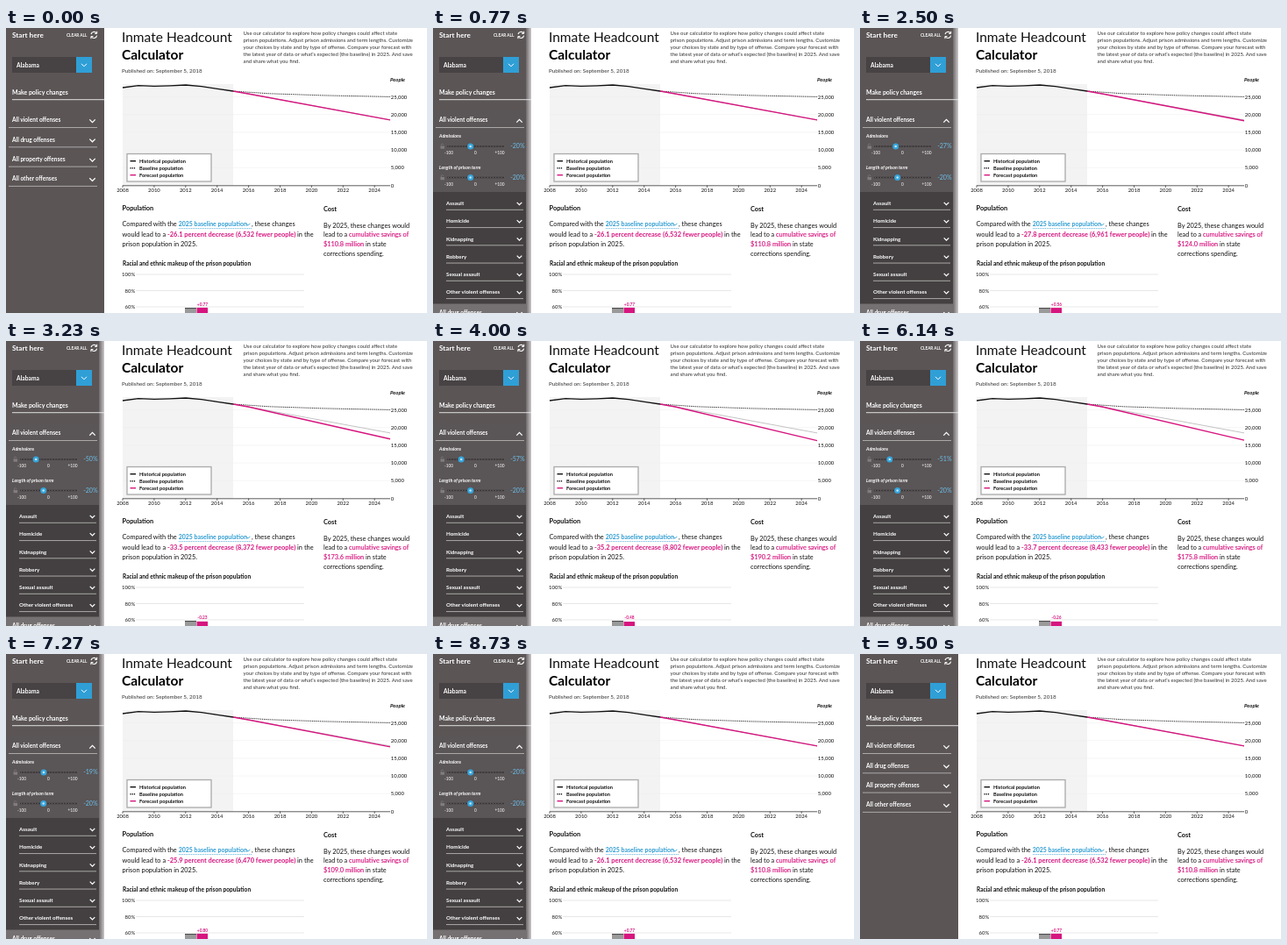
Write an HTML page that moves like this. It is 480x325 px and loops after 9.63 s.

```html
<!DOCTYPE html>
<html lang="en">
<head>
<meta charset="utf-8">
<title>Inmate Headcount Calculator</title>
<style>
html, body { margin: 0; width: 100%; height: 100%; overflow: hidden; background: #fff; }
svg { display: block; width: 480px; height: 325px; font-family: Lato, "Open Sans", sans-serif; }
.b { font-weight: 700; }
.i { font-style: italic; }
.pink { fill: #d6157f; }
.big { font-size: 7.48px; }
.soft { stroke: #d6157f; stroke-width: .15px; }
text { white-space: pre; }
</style>
</head>
<body>
<svg id="stage" viewBox="0 0 480 325" xmlns="http://www.w3.org/2000/svg">
  <defs>
    <linearGradient id="edge">
      <stop offset="0" stop-color="#6d6869"/>
      <stop offset="1" stop-color="#cbc8ca"/>
    </linearGradient>
  </defs>
</svg>
<script>
const LOOP = 9630;
const PINK = '#d6157f', BLUE = '#2b9bd2', SIDE = '#5b5556', RULE = '#b5b1b1';
const stage = document.getElementById('stage');

function add(parent, tag, attrs, content) {
  const node = document.createElementNS('http://www.w3.org/2000/svg', tag);
  for (const key in attrs) node.setAttribute(key, attrs[key]);
  if (content !== undefined) node.textContent = content;
  parent.appendChild(node);
  return node;
}
const group = parent => add(parent, 'g', {});
const rect = (g, x, y, width, height, fill, more) =>
  add(g, 'rect', { x, y, width, height, fill, ...more });
const path = (g, d, stroke, width, more) =>
  add(g, 'path', { d, stroke, 'stroke-width': width, fill: 'none', ...more });
const label = (g, x, y, size, content, fill = '#111', cls = '', more) =>
  add(g, 'text', { x, y, 'font-size': size, fill, class: cls, ...more }, content);
const chevron = (g, x, y, w = 3.2, dir = 1, color = '#fff', width = 1.3) =>
  path(g, `M${x - w} ${y - dir * w / 2}l${w} ${dir * w}l${w} ${-dir * w}`, color, width);
const span = (t, content, cls = '') => add(t, 'tspan', { class: cls }, content);
const END = { 'text-anchor': 'end' }, MID = { 'text-anchor': 'middle' };

// Heading and introduction
const main = group(stage);
label(main, 132, 16, 15.5, 'Inmate Headcount');
label(main, 132, 35.7, 15.5, 'Calculator', '#000', 'b');
label(main, 132, 51.4, 6.3, 'Published on: September 5, 2018', '#333');
[
  'Use our calculator to explore how policy changes could affect state',
  'prison populations. Adjust prison admissions and term lengths. Customize',
  'your choices by state and by type of offense. Compare your forecast with',
  'the latest year of data or what’s expected (the baseline) in 2025. And save',
  'and share what you find.'
].forEach((s, i) => label(main, 270.5, 7.6 + i * 8.05, 6.02, s, '#333'));

// Line chart
const BASE = 25006;
const yOf = n => 179.5 - n / 5000 * 20.2;
const forecastPath = n => `M259 72L276 75L438 ${yOf(n).toFixed(2)}`;

rect(main, 133, 64, 126, 115.5, '#f3f3f3');
label(main, 438, 61.2, 6, 'People', '#111', 'b i');
for (let n = 0; n <= 25000; n += 5000) {
  const y = yOf(n);
  if (n) path(main, `M133 ${y}H438`, '#ececec', 0.5);
  label(main, 438.8, y + 2, 5.9, n.toLocaleString('en-US'));
}
path(main, 'M133 179.8H438', '#333', 0.8);
for (let k = 0; k < 9; k++) {
  const x = 133 + k * 35.9;
  path(main, `M${x} 179.5v2.5`, '#333', 0.7);
  label(main, x, 187, 5.9, 2008 + 2 * k, '#111', '', MID);
}
path(main, forecastPath(BASE - 6532), '#bdbdbd', 0.9);
path(main, 'M259 72L300 74.8L360 76.8L438 78.4', '#222', 1, { 'stroke-dasharray': '1.2 1' });
const forecast = path(main, '', PINK, 1.4);
path(main, 'M133 68L151 65.6L169 66.4L187 65.8L205 65L223 66.6L241 69.3L259 72', '#111', 1.3);

rect(main, 138, 143.5, 96, 31.5, '#fff', { stroke: '#aaa', 'stroke-width': 1.3 });
[['Historical', '#111', ''], ['Baseline', '#111', '1.2 1'], ['Forecast', PINK, '']]
  .forEach(([name, color, dash], i) => {
    const y = 151.7 + i * 8;
    path(main, `M141.5 ${y}h6.5`, color, 1.4, dash ? { 'stroke-dasharray': dash } : {});
    label(main, 152, y + 1.9, 5.7, name + ' population', '#111', 'b');
  });

// Summary text
label(main, 132.5, 207.6, 7.4, 'Population', '#111', 'b');
label(main, 132.5, 225.6, 7.4, 'Compared with the');
label(main, 196.7, 225.6, 6.95, '2025 baseline population', BLUE, 'b');
path(main, 'M197 228.6H280', BLUE, 0.7, { 'stroke-dasharray': '1.2 .8' });
chevron(main, 276, 224, 2.4, 1, BLUE, 0.9);
label(main, 280, 225.6, 7.4, ', these changes');
const popLine = label(main, 132.5, 238, 7.4, '');
span(popLine, 'would lead to a ');
const popText = span(popLine, '', 'b pink big');
span(popLine, ' in the');
label(main, 132.5, 249.2, 7.4, 'prison population in 2025.');

label(main, 362, 208.6, 7.4, 'Cost', '#111', 'b');
label(main, 362, 227.7, 7.35, 'By 2025, these changes would');
const costLine = label(main, 362, 238.4, 7.25, '');
span(costLine, 'lead to a ');
span(costLine, 'cumulative savings of', 'pink soft');
const savedLine = label(main, 362, 249.4, 7.35, '');
const saved = span(savedLine, '', 'pink soft');
span(savedLine, ' in state');
label(main, 362, 260.2, 7.35, 'corrections spending.');

// Bar chart
label(main, 133, 271.2, 6.58, 'Racial and ethnic makeup of the prison population', '#111', 'b');
[100, 80, 60].forEach((n, i) => {
  const y = 281 + i * 18.5;
  path(main, `M148 ${y}H340`, '#dedede', 0.7);
  label(main, 147.2, y + 2.1, 5.95, n + '%', '#111', '', END);
});
rect(main, 204, 319.6, 13, 6, '#9a9a9a');
path(main, 'M204 319.6h13', '#333', 0.9);
const bar = rect(main, 217.5, 318.9, 12.5, 8, PINK);
const barText = label(main, 224, 316.6, 4.8, '', PINK, 'b', MID);

// Sidebar
const side = group(stage);
const sideText = (x, y, size, s, g = side) => label(g, x, y, size, s, '#fff', 'b');
rect(side, 0, 0, 112, 325, SIDE);
sideText(7, 11, 8.2, 'Start here');
sideText(69, 9.7, 4.65, 'CLEAR ALL');
path(side, 'M97 7.2a3.4 3.4 0 0 1 6.2 -1.2M103.6 8.6a3.4 3.4 0 0 1 -6.2 1.4', '#fff', 1.1);
path(side, 'M103.7 3.8v2.6h-2.6M96.9 12.2v-2.6h2.6', '#fff', 1);
rect(side, 7, 33, 73, 18, '#474243');
rect(side, 80, 33, 18, 18, '#2f9fd6');
chevron(side, 89, 42.3, 3, 1, '#fff', 1);
sideText(12, 44.5, 6.7, 'Alabama');
sideText(7, 75.8, 6.95, 'Make policy changes');

const panel = group(side);
rect(panel, 0, 94, 106, 93, '#5a5556');
rect(panel, 0, 187, 106, 140, '#444041');

function slider(name, y) {
  label(panel, 7, y - 9.7, 5.3, name, '#fff', 'b i');
  rect(panel, 8.5, y - 0.5, 4.5, 3.2, '#817c7d');
  path(panel, `M9.4 ${y - 0.5}v-1.2a1.2 1.2 0 0 1 2.4 0`, '#817c7d', 0.7);
  path(panel, `M16 ${y}H81`, '#383435', 1.6);
  path(panel, `M17 ${y}H81`, '#8b8788', 0.8, { 'stroke-dasharray': '.7 2.5' });
  [['-100', 18], ['0', 48.5], ['+100', 76]].forEach(([s, x]) =>
    label(panel, x, y + 9.4, 4.8, s, '#fff', '', MID));
  const knob = group(panel);
  add(knob, 'circle', { cy: y, r: 3.5, fill: '#35a5dc' });
  add(knob, 'circle', { cy: y, r: 1.3, fill: '#c4e6f6' });
  const value = label(panel, 104.7, y + 2.1, 7.1, '', '#6cc0ec', '', END);
  return v => {
    knob.setAttribute('transform', `translate(${48.4 + v * 0.285} 0)`);
    value.textContent = v + '%';
  };
}
const setAdmissions = slider('Admissions', 135);
slider('Length of prison term', 170.5)(-20);

['Assault', 'Homicide', 'Kidnapping', 'Robbery', 'Sexual assault', 'Other violent offenses']
  .forEach((name, i) => {
    const y = 202 + i * 20.25;
    sideText(15, y, 6.2, name, panel);
    chevron(panel, 98.5, y - 1.7, 2.8);
    path(panel, `M15 ${y + 5.3}H103`, RULE, 0.9);
  });

sideText(7, 107.4, 6.55, 'All violent offenses');
const down = chevron(side, 98.5, 106);
const up = chevron(side, 98.5, 106, 3.2, -1);
path(side, 'M3 113.5H104', RULE, 0.9);

const rest = group(side);
const restBack = rect(rest, 0, 117, 112, 220, SIDE);
['drug', 'property', 'other'].forEach((name, i) => {
  const y = 129.6 + i * 22.3;
  sideText(7, y, 6.55, `All ${name} offenses`, rest);
  chevron(rest, 98.5, y - 1.4);
  path(rest, `M3 ${y + 6.2}H104`, RULE, 0.9);
});
const strip = rect(side, 106, 0, 6, 325, 'url(#edge)');
path(side, 'M7 81.7H112', '#eee', 0.9);

// Tables of steps: [time, value]
const admissions = [
  [0, -20], [2150, -20], [2500, -27], [3050, -48], [4000, -57],
  [4600, -59], [5500, -59], [6140, -51], [7270, -19], [7700, -19], [8000, -20]
];
const drawer = [[200, 0], [560, 1], [9130, 1], [9460, 0]];
// [admissions, fewer people, savings, change in share]
const results = [
  [-60, 8987, 197.4, -0.59], [-57, 8802, 190.2, -0.48], [-51, 8433, 175.8, -0.26],
  [-27, 6961, 124, 0.56], [-20, 6532, 110.8, 0.77], [-19, 6470, 109, 0.8]
];
const CHART_LAG = 180;

function lookup(table, x, col = 1, ease = f => f) {
  if (x <= table[0][0]) return table[0][col];
  for (let i = 1; i < table.length; i++) {
    const a = table[i - 1], b = table[i];
    if (x <= b[0]) return a[col] + (b[col] - a[col]) * ease((x - a[0]) / (b[0] - a[0]));
  }
  return table[table.length - 1][col];
}
const smooth = f => f * f * (3 - 2 * f);
const show = (node, on) => node.setAttribute('visibility', on ? 'visible' : 'hidden');

function draw(t) {
  const v = Math.round(lookup(admissions, t));
  const fewer = Math.round(lookup(results, v));
  const share = lookup(results, v, 3);
  const drawn = lookup(results, lookup(admissions, t - CHART_LAG));
  setAdmissions(v);
  forecast.setAttribute('d', forecastPath(BASE - drawn));
  popText.textContent = `-${(fewer / BASE * 100).toFixed(1)} percent decrease (${fewer.toLocaleString('en-US')} fewer people)`;
  saved.textContent = `$${lookup(results, v, 2).toFixed(1)} million`;
  barText.textContent = (share > 0 ? '+' : '') + share.toFixed(2);
  bar.setAttribute('y', 319.6 - share * 0.925);

  const open = lookup(drawer, t, 1, smooth);
  rest.setAttribute('transform', `translate(0 ${open * 197.5})`);
  restBack.setAttribute('fill', open > 0.5 ? '#757071' : SIDE);
  [panel, up, strip].forEach(node => show(node, open > 0));
  show(down, open === 0);
}

const start = performance.now();
function tick() {
  draw((performance.now() - start) % LOOP);
  requestAnimationFrame(tick);
}
tick();
</script>
</body>
</html>
```
